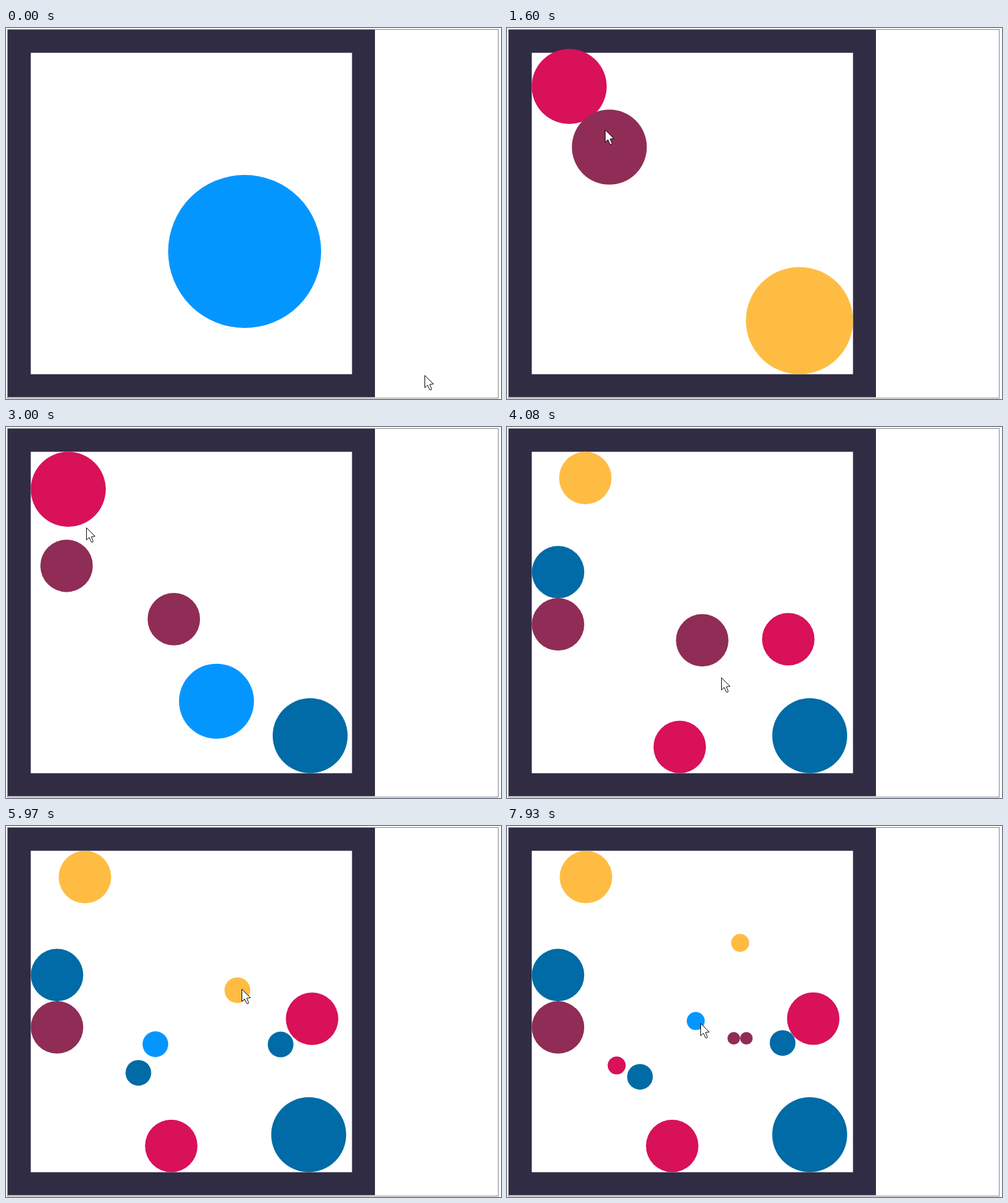
An HTML page with a canvas for the animation above (8 s loop, 809 px wide and 606 px high).

```html
<!DOCTYPE html>
<html lang="en">
<head>
<meta charset="utf-8">
<title>Splitting bubbles</title>
<style>
html, body { margin: 0; width: 100%; height: 100%; overflow: hidden; background: #fff; }
canvas { display: block; }
</style>
</head>
<body>
<canvas id="stage" width="809" height="606"></canvas>
<script>
const ctx = document.getElementById('stage').getContext('2d');
const LOOP = 8000, NEAR = 40.5, FAR = 565.5;
const BLUE = '#0496ff', DEEP = '#006ba6', GOLD = '#ffbc42', PINK = '#d81159', PLUM = '#8f2d56';

// A bubble glides to its rest point; a bump sends it to a new one, a split replaces it by two
class Bubble {
  constructor(color, x, y) {
    Object.assign(this, { color, x, y, start: 0, end: LOOP, r: 125, from: [x, y], kids: [] });
  }
  bump(time, x, y) {
    this.push = { time, x, y };
    return this;
  }
  split(time, ...kids) {
    this.end = time;
    this.kids = kids;
    return this;
  }
  // Children start side by side, along the line between their rest points
  hatch() {
    const [a, b] = this.kids;
    if (!a) return;
    const [x, y] = this.at(this.end), angle = Math.atan2(b.y - a.y, b.x - a.x);
    this.kids.forEach((kid, i) => {
      kid.start = this.end;
      kid.r = this.r * 0.7;
      const reach = i ? kid.r : -kid.r;
      kid.from = [x + reach * Math.cos(angle), y + reach * Math.sin(angle)];
      kid.hatch();
    });
  }
  // Smaller bubbles slide longer; walls give way a little just after a split
  glide(from, to, age, life) {
    const left = Math.exp(-age * this.r / 16250), inset = this.r - 9 * Math.exp(-life / 100);
    return to.map((p, i) => {
      const pos = p + (from[i] - p) * left;
      return Math.min(Math.max(pos, NEAR + inset), FAR - inset);
    });
  }
  at(t) {
    const { push, start } = this, bumped = push && t > push.time;
    const time = bumped ? push.time : t;
    const pos = this.glide(this.from, [this.x, this.y], time - start, time - start);
    return bumped ? this.glide(pos, [push.x, push.y], t - time, t - start) : pos;
  }
  draw(t) {
    if (t >= this.end) return this.kids.forEach(kid => kid.draw(t));
    ctx.fillStyle = this.color;
    ctx.beginPath();
    ctx.arc(...this.at(t), this.r, 0, 2 * Math.PI);
    ctx.fill();
  }
}

const bubble = (...args) => new Bubble(...args);

const goldPair = bubble(GOLD, 387.8, 261.5).split(5985,
  bubble(GOLD, 381.6, 178),
  bubble(PLUM, 381.5, 361).split(7870, bubble(PLUM, 370, 347), bubble(PLUM, 392, 347)));

const bluePair = bubble(BLUE, 195, 354.3).bump(5970, 243.5, 355).split(6660,
  bubble(BLUE, 332.5, 304.7),
  bubble(PINK, 155.3, 404.2));

const plumTree = bubble(PLUM, 276.4, 316.8).bump(3000, 321.8, 350.6).split(4200,
  bubble(GOLD, 348, 358.5).split(5210, bluePair, bubble(DEEP, 497, 355).bump(5970, 450.6, 354.2)),
  bubble(PLUM, 296, 318).split(4380, goldPair, bubble(DEEP, 207, 412.4).bump(5970, 217.4, 410.2)));

const pinkTree = bubble(PINK, 145, 100).bump(1003, 133, 139).split(1565,
  bubble(PINK, 101.7, 101.7).split(3040, bubble(GOLD, 129, 83.4), bubble(DEEP, 83, 243.5)),
  bubble(PLUM, 176, 222).split(1710, plumTree, bubble(PLUM, 97.9, 228.2).bump(3040, 80, 329)));

const goldTree = bubble(GOLD, 478, 478).split(2250,
  bubble(BLUE, 339.2, 447.4).split(3640, bubble(PINK, 500.5, 314.7), bubble(PINK, 270, 545)),
  bubble(DEEP, 494.7, 504.6));

const root = bubble(BLUE, 390, 365).split(330, goldTree, pinkTree);
root.hatch();

// The pointer wanders through a few places and dips into each bubble as it splits
const places = [[70, 684, 567], [850, 373, 351], [1600, 161, 167], [3000, 132, 165],
  [4080, 350, 410], [5190, 321, 349], [5970, 385.6, 267], [7930, 316, 322]];

const splits = b => b.kids.length ? [b, ...b.kids.flatMap(splits)] : [];

const pointer = [...places, ...splits(root).map(b => [b.end, b])]
  .sort((a, b) => a[0] - b[0])
  .reduce((path, [time, x, y]) => {
    if (x instanceof Bubble) {
      const [, px, py] = path[path.length - 1], [cx, cy] = x.at(time);
      const angle = Math.atan2(py - cy, px - cx), depth = 0.6 * x.r;
      [x, y] = [cx + depth * Math.cos(angle), cy + depth * Math.sin(angle)];
    }
    return [...path, [time, x, y]];
  }, []);

// Smooth curve through the stops, with slopes taken from the neighbours
function curve(path, t) {
  const next = path.findIndex(p => p[0] > t);
  if (next < 1) return path[next ? path.length - 1 : 0].slice(1);
  const a = path[next - 1], b = path[next], span = b[0] - a[0], u = (t - a[0]) / span;
  const slope = (j, k) => {
    const p = path[j - 1], n = path[j + 1];
    return p && n ? (n[k] - p[k]) / (n[0] - p[0]) * span : 0;
  };
  return [1, 2].map(k =>
    a[k] + (b[k] - a[k]) * u * u * (3 - 2 * u) +
    slope(next - 1, k) * u * (1 - u) ** 2 - slope(next, k) * u * u * (1 - u));
}

function drawRoom() {
  ctx.fillStyle = '#fff';
  ctx.fillRect(0, 0, 809, 606);
  ctx.lineWidth = 1;
  ctx.strokeStyle = '#808080';
  ctx.strokeRect(2.5, 2.5, 802, 602);
  ctx.fillStyle = '#2f2c44';
  ctx.fillRect(3, 3, 600, 600);
  ctx.fillStyle = '#fff';
  ctx.fillRect(NEAR, NEAR, FAR - NEAR, FAR - NEAR);
}

function drawPointer(t) {
  const [x, y] = curve(pointer, t).map(p => Math.floor(p + 0.01) + 0.5);
  const outline = [[0, 0], [0, 20], [4.5, 16], [8, 23.5], [10.5, 23.5], [11, 22], [8, 14.8], [14, 14]];
  ctx.beginPath();
  for (const [dx, dy] of outline) ctx.lineTo(x + dx, y + dy);
  ctx.closePath();
  ctx.fillStyle = '#fff';
  ctx.fill();
  ctx.strokeStyle = '#000';
  ctx.stroke();
}

function draw() {
  const t = performance.now() % LOOP;
  drawRoom();
  root.draw(t);
  drawPointer(t);
  requestAnimationFrame(draw);
}
draw();
</script>
</body>
</html>
```
